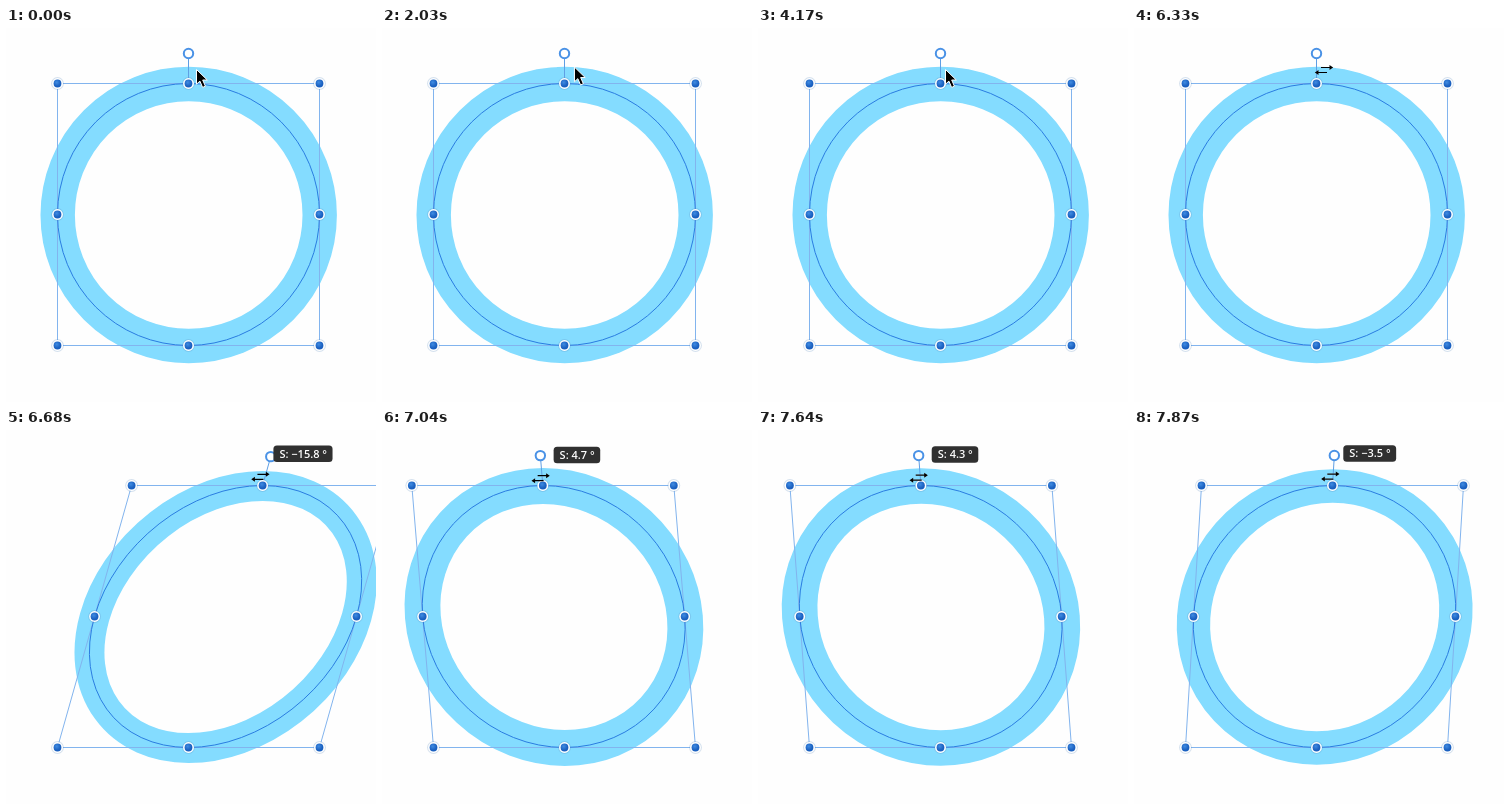
These frames come from a looping animation (370x374 px, 7990 ms). An HTML page:

```html
<!DOCTYPE html>
<html lang="en">
<head>
<meta charset="utf-8">
<title>Shear a ring</title>
<style>
  html, body { margin: 0; width: 100%; height: 100%; overflow: hidden; background: #fefefe; }
  svg { display: block; }
  .thin { fill: none; stroke-width: 1; vector-effect: non-scaling-stroke; }
  #tip text { font: 600 11px "Open Sans", "Noto Sans", sans-serif; fill: #fff; }
</style>
</head>
<body>
<svg width="370" height="374" viewBox="0 0 370 374">
  <defs>
    <radialGradient id="blue" cx="40%" cy="35%">
      <stop offset="0" stop-color="#3f8be2"/>
      <stop offset="1" stop-color="#1a60c0"/>
    </radialGradient>
    <g id="knob">
      <circle r="6.4" fill="#5a8cc0" opacity=".25"/>
      <circle r="5.4" fill="#fff"/>
      <circle r="3.9" fill="url(#blue)"/>
    </g>
    <g id="arrow">
      <path d="M-3 -2.5H7M3 2.5H-7" stroke-width="1.2"/>
      <path d="M9.2 -2.5L5.5 -5V0ZM-9.2 2.5L-5.5 0V5Z" stroke="none"/>
    </g>
  </defs>
  <g id="shape">
    <circle id="ring" cx="182.7" cy="187" r="131" fill="none" stroke="#84dcff" vector-effect="non-scaling-stroke"/>
    <rect class="thin" x="51.5" y="55.5" width="262" height="262" stroke="#82b4ee"/>
    <circle class="thin" cx="182.5" cy="186.5" r="131" stroke="#2a7de1"/>
  </g>
  <line id="stem" stroke="#5f9fe4"/>
  <circle id="spin" r="4.7" fill="#fff" stroke="#4a92e6" stroke-width="2"/>
  <g id="knobs"></g>
  <path id="pointer" d="M.5 .5V15.2L3.9 12.1L6.6 18.4L9.4 17.2L6.7 11H11.3Z" fill="#000" stroke="#fff"/>
  <g id="shear">
    <use href="#arrow" fill="#fff" stroke="#fff" stroke-width="3" opacity=".6"/>
    <use href="#arrow" fill="#000" stroke="#000"/>
  </g>
  <g id="tip">
    <rect height="16.5" rx="3.5" fill="#303030"/>
    <text x="6" y="12.2"></text>
  </g>
</svg>
<script>
const LOOP = 7990, TICKS = 67, LEAD = 8;
const LEFT = 51.5, TOP = 55.5, SIZE = 262, BASE = TOP + SIZE;
const SHEAR_AT = 41, DRAG_AT = 54;

// each glide: first tick, last tick, where it ends
const hover = [
  [0, 2, 173, 31], [2, 3, 193, 39], [16, 23, 174, 31], [25, 31, 181, 38],
  [34, 35, 187, 41], [35, 41, 180, 43], [52, 53, 190, 42]
];
// same, with the shift of the top edge in place of x
const drag = [[53, 56, 74.1, 46.8], [57, 60, -55.2, 48.7], [62, 66, 16, 46.6]];

const $ = id => document.getElementById(id);
const put = (el, attrs) => { for (const k in attrs) el.setAttribute(k, attrs[k]); };
const place = (el, x, y) => put(el, { transform: `translate(${x} ${y})` });
const show = (el, on) => put(el, { display: on ? "inline" : "none" });
const smooth = u => u * u * (3 - 2 * u);

function glide(x, y, path, tick) {
  for (const [from, to, tx, ty] of path) {
    const u = smooth(Math.min(1, Math.max(0, (tick - from) / (to - from))));
    x += (tx - x) * u;
    y += (ty - y) * u;
  }
  return [x, y];
}

const knobs = [];
for (let i = 0; i < 9; i++) {
  if (i === 4) continue;
  const el = document.createElementNS("http://www.w3.org/2000/svg", "use");
  put(el, { href: "#knob" });
  $("knobs").append(el);
  knobs.push({ el, u: i % 3 / 2, v: Math.floor(i / 3) / 2 });
}
const [tipBox, tipText] = $("tip").children;

function drawShape(dx) {
  const k = dx / SIZE, a = Math.atan(k), mid = LEFT + SIZE / 2 + dx;
  put($("shape"), { transform: `matrix(1 0 ${-k} 1 ${BASE * k} 0)` });
  // line width follows the sheared diagonal
  put($("ring"), { "stroke-width": 34.4 * Math.hypot(1 - k, 1) / Math.SQRT2 });
  const x = mid + 30 * Math.sin(a), y = TOP - 30 * Math.cos(a);
  put($("stem"), { x1: mid, y1: TOP, x2: x, y2: y });
  put($("spin"), { cx: x, cy: y });
  for (const { el, u, v } of knobs) place(el, LEFT + u * SIZE + dx * (1 - v), TOP + v * SIZE);
  return -a * 180 / Math.PI;
}

function drawTip(x, y, angle) {
  tipText.textContent = `S: ${angle < 0 ? "−" : ""}${Math.abs(angle).toFixed(1)} °`;
  put(tipBox, { width: tipText.getComputedTextLength() + 11.5 });
  place($("tip"), x + 13, y - 31.4);
}

function draw(t) {
  const tick = Math.min(TICKS - 1, Math.floor((t + LEAD) * TICKS / LOOP));
  const dragging = tick >= DRAG_AT, shearing = tick >= SHEAR_AT;
  const [dx, dragY] = glide(0, 42, drag, tick);
  const [x, y] = dragging ? [180.3 + dx, dragY] : glide(190, 41, hover, tick);
  const angle = drawShape(dx);
  show($("pointer"), !shearing);
  show($("shear"), shearing);
  show($("tip"), dragging);
  place($(shearing ? "shear" : "pointer"), x, y);
  if (dragging) drawTip(x, y, angle);
}

const start = performance.now();
function loop() {
  draw((performance.now() - start) % LOOP);
  requestAnimationFrame(loop);
}
loop();
</script>
</body>
</html>
```
